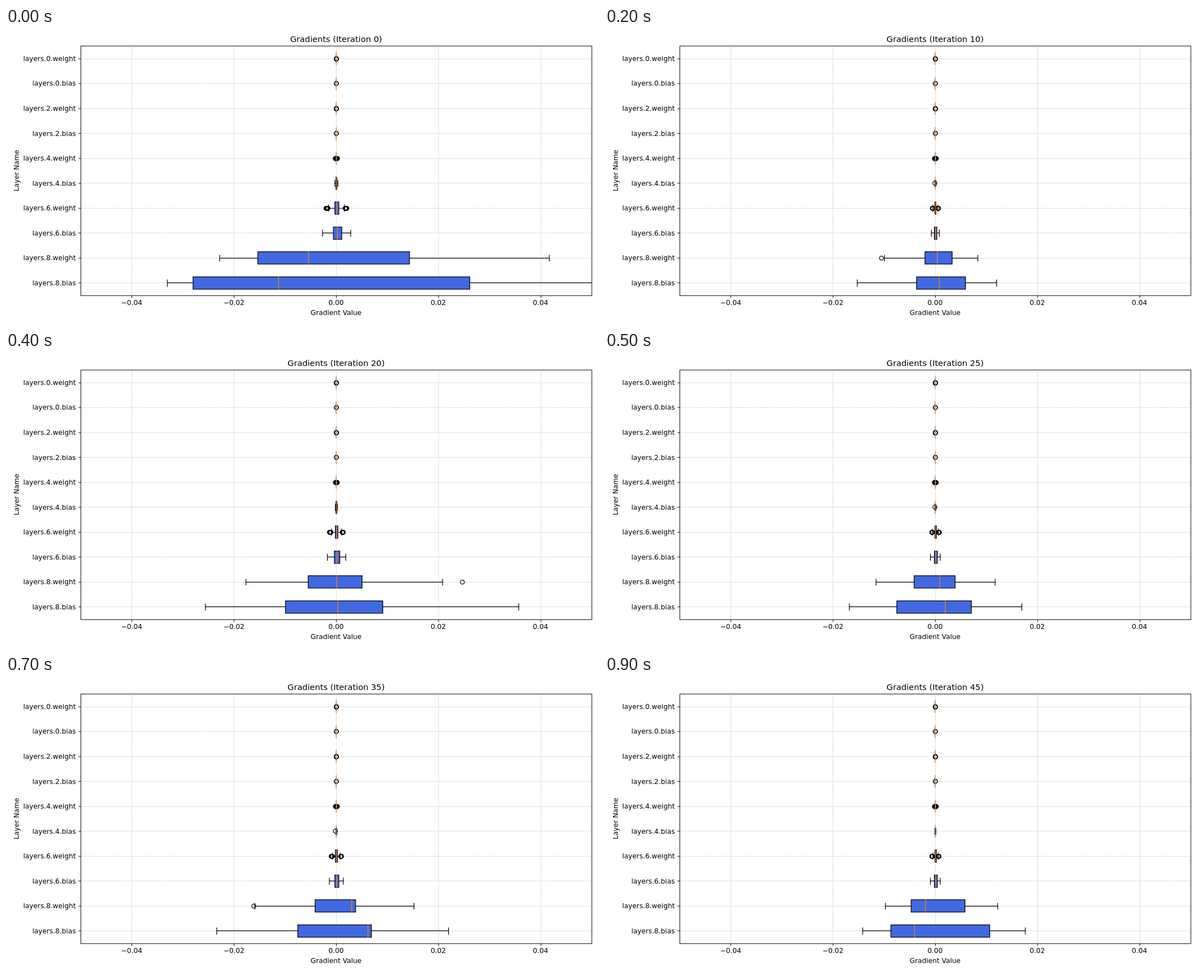
Animation of 1058 by 529 pixels, one loop 1000 ms. Source, as an HTML page with a canvas:

```html
<!DOCTYPE html>
<html lang="en">
<head>
<meta charset="utf-8">
<title>Gradients</title>
<style>
  html, body { margin: 0; width: 100%; height: 100%; overflow: hidden; background: #fff; }
  canvas { display: block; width: 1058px; height: 529px; }
</style>
</head>
<body>
<canvas id="stage" width="1058" height="529"></canvas>
<script>
const ctx = document.getElementById('stage').getContext('2d');
const STEP = 100, STEPS = 10;

// The chart is laid out on a 1200 x 600 sheet at 100 dpi.
const WIDTH = 1200, HEIGHT = 600, PT = 100 / 72;
const LEFT = 151, RIGHT = 1185, TOP = 36.4, BOTTOM = 541.6;
const MID_X = (LEFT + RIGHT) / 2, ROW = (BOTTOM - TOP) / 10;
const FONT = '"DejaVu Sans", Verdana, sans-serif';
const BLUE = '#4169e1', ORANGE = '#ff7f0e', TAN = '#d9935a', GREY = '#b0b0b0';

const snap = v => Math.floor(v + 0.5) + 0.5;
const toX = v => MID_X + v * (RIGHT - LEFT) / 100; // v in thousandths
const rowY = i => TOP + (i + 0.5) * ROW;
const scaled = (list, k) => list.map(v => v * k);

// Key poses of the last layer: minimum, quartiles and maximum, in thousandths.
const poses = {
  0: [-33.1, -28, -11.3, 26.1, 60.4],
  1: [-25.1, -7.6, -5.8, 12.9, 26.9],
  2: [-15.3, -3.7, 0.8, 5.9, 12],
  4: [-25.6, -10, 0.3, 9.1, 35.7],
  5: [-16.8, -7.5, 1.9, 7.1, 16.9],
  7: [-23.4, -7.5, 6.2, 6.9, 22],
  8: [-18, -8, 0, 10, 27.9],
  9: [-14.2, -8.7, -4.1, 10.6, 17.6]
};

// A key pose, or the mean of its neighbours.
function poseAt(step) {
  if (poses[step]) return poses[step];
  return poses[step - 1].map((v, i) => (v + poses[step + 1][i]) / 2);
}

function line(x1, y1, x2, y2, color = '#000', points = 1) {
  ctx.strokeStyle = color;
  ctx.lineWidth = points * PT;
  ctx.beginPath();
  ctx.moveTo(x1, y1);
  ctx.lineTo(x2, y2);
  ctx.stroke();
}

function text(str, x, y, align = 'center', points = 10) {
  ctx.font = `${points * PT}px ${FONT}`;
  ctx.textAlign = align;
  ctx.fillStyle = '#000';
  ctx.fillText(str, x, y);
}

function dots(row, values) {
  ctx.strokeStyle = '#000';
  ctx.lineWidth = PT;
  for (const v of values) {
    ctx.beginPath();
    ctx.arc(snap(toX(v)), snap(rowY(row)), 3 * PT, 0, Math.PI * 2);
    ctx.stroke();
  }
}

function spread(from, to, count = 8) {
  return Array.from({ length: count }, (_, i) => from + (to - from) * i / (count - 1));
}

// Extremes beyond 1.5 box lengths become outliers.
function box(row, [min, q1, median, q3, max], outliers = []) {
  const reach = 1.5 * (q3 - q1);
  const low = Math.max(min, q1 - reach), high = Math.min(max, q3 + reach);
  const extremes = [min, max].filter(v => v < low || v > high);
  const [a, l, m, r, b] = [low, q1, median, q3, high].map(v => snap(toX(v)));
  const y = rowY(row), mid = snap(y);
  const y1 = snap(y - ROW / 4), y2 = snap(y + ROW / 4);

  ctx.fillStyle = BLUE;
  ctx.fillRect(l, y1, r - l, y2 - y1);
  ctx.strokeStyle = '#000';
  ctx.lineWidth = PT;
  ctx.strokeRect(l, y1, r - l, y2 - y1);
  line(a, mid, l, mid);
  line(r, mid, b, mid);
  for (const x of [a, b]) line(x, snap(y - ROW / 8), x, snap(y + ROW / 8));
  dots(row, [...outliers, ...extremes]);
  line(m, y1, m, y2, r - l < 1 ? TAN : ORANGE);
}

function drawBoxes(step) {
  const last = poseAt(step), [min, , , , max] = last;
  const w = 0.029 * (max - min); // earlier layers shrink with the last one
  const flat = [0, 0, 0, 0, 0];

  ctx.save();
  ctx.beginPath();
  ctx.rect(LEFT, TOP, RIGHT - LEFT, BOTTOM - TOP);
  ctx.clip();
  for (const row of [0, 2]) box(row, flat, spread(-0.04, 0.04));
  for (const row of [1, 3]) box(row, flat, [0, 0]);
  const blob = 0.13 + 0.04 * w;
  box(4, flat, spread(-blob, blob));
  box(5, scaled([-0.1, -0.03, 0, 0.03, 0.1], w), min + max < 2.5 ? [-0.13 * w] : []);
  box(6, scaled([-0.56, -0.12, 0.03, 0.18, 0.58], w),
    [...spread(-0.74 * w, -0.6 * w), ...spread(0.64 * w, 0.76 * w)]);
  box(7, scaled([-1, -0.22, 0.08, 0.4, 1.03], w));
  box(8, last.map((v, i) => v * [0.69, 0.55, 0.48, 0.55, 0.69][i]));
  box(9, last);
  ctx.restore();
}

function drawGrid() {
  ctx.lineCap = 'butt';
  ctx.setLineDash([3.7 * 0.5 * PT, 1.6 * 0.5 * PT]);
  for (let v = -40; v <= 40; v += 20) {
    line(snap(toX(v)), BOTTOM, snap(toX(v)), TOP, GREY, 0.5);
  }
  for (let i = 0; i < 10; i++) {
    line(LEFT, snap(rowY(i)), RIGHT, snap(rowY(i)), GREY, 0.5);
  }
  ctx.setLineDash([]);
}

function drawAxes(step) {
  const tick = 3.5 * PT, [left, right, top, bottom] = [LEFT, RIGHT, TOP, BOTTOM].map(snap);
  ctx.lineCap = 'butt';
  ctx.strokeStyle = '#000';
  ctx.lineWidth = 0.8 * PT;
  ctx.strokeRect(left, top, right - left, bottom - top);
  for (let v = -40; v <= 40; v += 20) {
    const x = snap(toX(v));
    line(x, bottom, x, bottom + tick, '#000', 0.8);
    text((v < 0 ? '\u2212' : '') + Math.abs(v / 1000).toFixed(2), toX(v), 562);
  }
  for (let i = 0; i < 10; i++) {
    const y = snap(rowY(i));
    line(left - tick, y, left, y, '#000', 0.8);
    text(`layers.${i - i % 2}.${i % 2 ? 'bias' : 'weight'}`,
      LEFT - 2 * tick, Math.round(rowY(i) + 5.3), 'right');
  }
  text(`Gradients (Iteration ${step * 5})`, MID_X, 28, 'center', 12);
  text('Gradient Value', MID_X, 582);
  ctx.save();
  ctx.translate(26, (TOP + BOTTOM) / 2);
  ctx.rotate(-Math.PI / 2);
  text('Layer Name', 0, 0);
  ctx.restore();
}

function draw(time) {
  const step = Math.floor(time / STEP) % STEPS;
  ctx.setTransform(1058 / WIDTH, 0, 0, 529 / HEIGHT, 0, 0);
  ctx.fillStyle = '#fff';
  ctx.fillRect(0, 0, WIDTH, HEIGHT);
  drawGrid();
  ctx.lineCap = 'square';
  drawBoxes(step);
  drawAxes(step);
}

const start = performance.now();
function tick() {
  draw(Math.max(0, performance.now() - start));
  requestAnimationFrame(tick);
}
tick();
</script>
</body>
</html>
```
